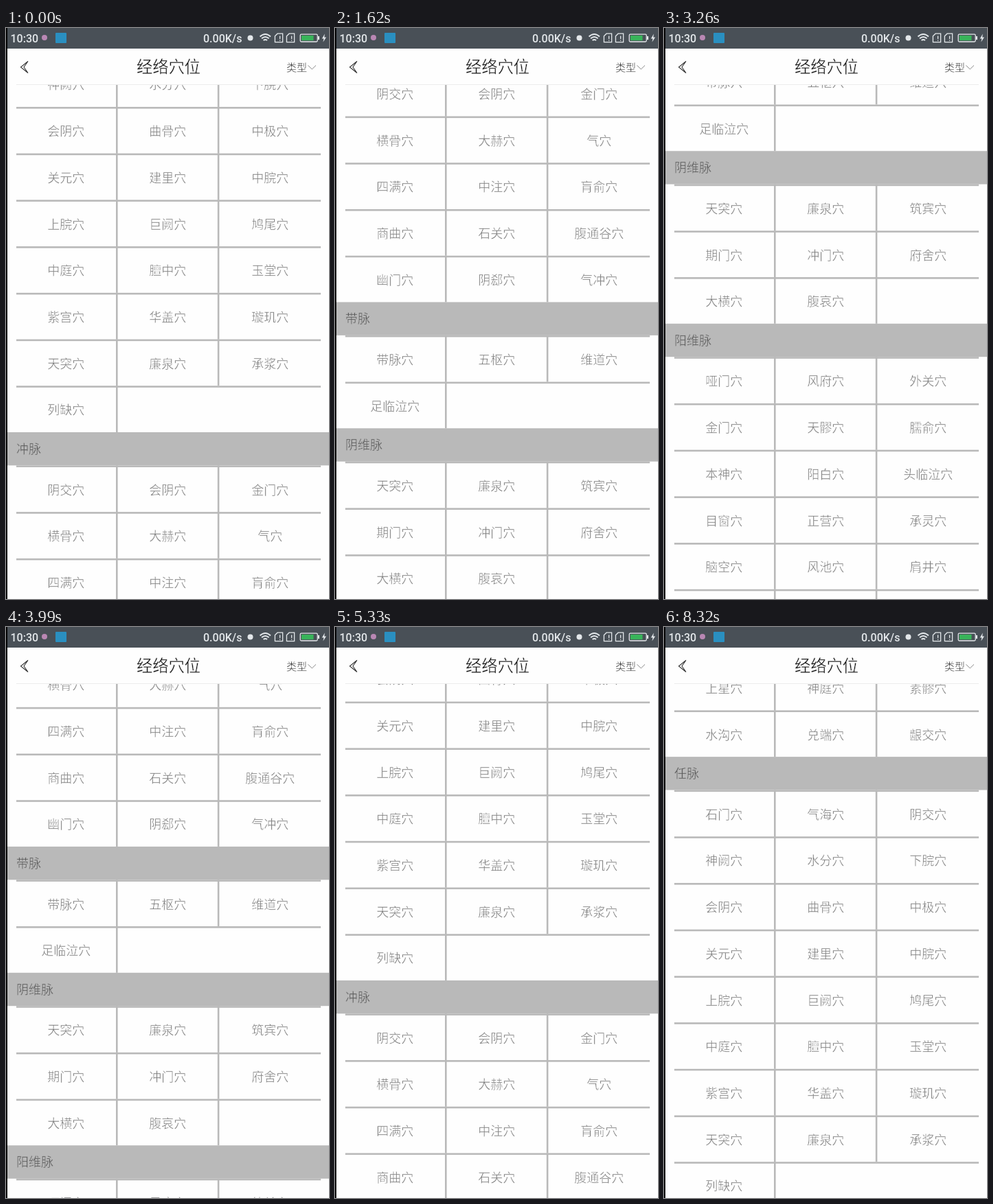
These frames come from a looping animation (470 px wide and 832 px high, 8.37 s). An HTML page:

```html
<!DOCTYPE html>
<html lang="zh-CN">
<head>
<meta charset="utf-8">
<title>经络穴位</title>
<style>
  html, body { margin: 0; width: 100%; height: 100%; overflow: hidden; background: #fefefe; }
  svg { display: block; width: 100vw; height: 100vh; }
  /* A stroke in the background colour gives the glyphs a light weight. */
  text { font-family: "Noto Sans CJK SC", "Noto Sans CJK", sans-serif; font-weight: 300; stroke: #fefefe; stroke-width: .45; }
  .status { font: 500 16px Roboto, sans-serif; fill: #e3e7ea; stroke: none; }
  .cell { font-size: 18px; fill: #7c7c7c; text-anchor: middle; }
  .head { font-size: 18px; fill: #555; stroke: #b9b9b9; }
</style>
</head>
<body>
<svg viewBox="0 0 470 832" preserveAspectRatio="none">
  <defs><clipPath id="view"><rect y="83" width="470" height="749"/></clipPath></defs>
  <rect width="470" height="832" fill="#fefefe"/>
  <path d="M15 82.5H458" stroke="#ececec"/>
  <g clip-path="url(#view)"><g id="list"></g></g>

  <!-- title bar -->
  <g fill="none" stroke="#333">
    <path d="M32 48.5L21.5 57L32 65.5L26 57Z" stroke-width="1.1"/>
    <path d="M439.5 54.5L445.3 60L451 54.5" stroke="#888"/>
  </g>
  <text x="236.5" y="65.4" font-size="23.3" text-anchor="middle" fill="#111">经络穴位</text>
  <text x="408" y="62.6" font-size="15" fill="#222">类型</text>

  <!-- status bar -->
  <rect width="470" height="30" fill="#495057"/>
  <text class="status" x="6.5" y="21">10:30</text>
  <circle cx="56" cy="14" r="4" fill="#b987b4"/>
  <rect x="72" y="7" width="16" height="15" rx="1" fill="#2a8fc0"/>
  <text class="status" x="287" y="21">0.00K/s</text>
  <circle cx="355.5" cy="14.5" r="4" fill="#e3e7ea"/>
  <g fill="none" stroke="#e3e7ea" stroke-width="1.9">
    <path d="M369.5 12.5Q377.3 5.5 385 12.5M372 15.3Q377.3 10.6 382.6 15.3M374.6 18Q377.3 15.8 380 18"/>
    <g id="sim" stroke-width="1.3">
      <path d="M395 8.2H402.6V20.6H391.4V11.8Z"/>
      <path d="M398.6 11.5V16M398.6 17.4V18.8"/>
    </g>
    <use href="#sim" x="17"/>
    <rect x="428.2" y="9.2" width="25" height="10.8" rx="1.5" stroke-width="1.3"/>
  </g>
  <rect x="454" y="12" width="2" height="5" fill="#e3e7ea"/>
  <rect x="430" y="11" width="17.5" height="7.2" fill="#39b45a"/>
  <path d="M463.8 8.5L459.8 15.4H462.4L461.4 20.5L466 13.4H463.2Z" fill="#e3e7ea"/>
  <rect width="2" height="832" fill="#000"/>
</svg>
<script>
const LOOP = 8370, ROW = 67.72, HEAD = 48.4, LINE = 2.6, GRAY = "#b9b9b9";
const COLUMNS = [87.25, 235.25, 384.25], DIVIDERS = [160, 307.8];

// Rows are split by "/"; every name gets the suffix 穴.
const SECTIONS = [
  ["", "上星 神庭 素髎/水沟 兑端 龈交"],
  ["任脉", "石门 气海 阴交/神阙 水分 下脘/会阴 曲骨 中极/关元 建里 中脘/上脘 巨阙 鸠尾/中庭 膻中 玉堂/紫宫 华盖 璇玑/天突 廉泉 承浆/列缺"],
  ["冲脉", "阴交 会阴 金门/横骨 大赫 气/四满 中注 肓俞/商曲 石关 腹通谷/幽门 阴郄 气冲"],
  ["带脉", "带脉 五枢 维道/足临泣"],
  ["阴维脉", "天突 廉泉 筑宾/期门 冲门 府舍/大横 腹哀"],
  ["阳维脉", "哑门 风府 外关/金门 天髎 臑俞/本神 阳白 头临泣/目窗 正营 承灵/脑空 风池 肩井/阳交 臑会"]
];

// Position of the 冲脉 header over time; each swipe moves on from the last one.
const START = 589;
const SWIPES = [
  { start: 150, end: 880, steps: 6, to: 300.2, decay: 2.2 },
  { start: 1180, end: 2210, steps: 8, to: -143, decay: 2.2 },
  { start: 2510, end: 3550, steps: 8, to: -411.3, decay: 2.366 },
  { start: 3700, end: 4880, steps: 9, to: 423.1, decay: 2.2 },
  { start: 5180, end: 6520, steps: 10, to: 847, decay: 2.2 }
];

const list = document.getElementById("list");

function add(tag, attrs, content) {
  const el = document.createElementNS("http://www.w3.org/2000/svg", tag);
  for (const key in attrs) el.setAttribute(key, attrs[key]);
  if (content) el.textContent = content;
  list.appendChild(el);
}

const box = (x, y, width, height) => add("rect", { x, y, width, height, fill: GRAY });

function addRow(names, y) {
  box(15, y, 443, LINE);
  DIVIDERS.slice(0, names.length).forEach(x => box(x, y, LINE, ROW));
  names.forEach((name, i) => add("text", { class: "cell", x: COLUMNS[i], y: y + 42.2 }, name + "穴"));
}

function buildList() {
  let y = -(11 * ROW + HEAD);
  for (const [title, rows] of SECTIONS) {
    if (title) {
      box(2, y, 468, HEAD);
      add("text", { class: "head", x: 15, y: y + 31 }, title);
      y += HEAD;
    }
    for (const row of rows.split("/")) {
      addRow(row.split(" "), y);
      y += ROW;
    }
  }
}

const fling = (u, decay) => 1 - Math.pow(1 - Math.pow(u, 1.4), decay);

function scrollAt(t) {
  let y = START;
  for (const { start, end, steps, to, decay } of SWIPES) {
    const gap = (end - start) / (steps - 1);
    const step = Math.min(steps, 1 + Math.floor((t + 6 - start) / gap));
    if (step < 1) break;
    y += (to - y) * fling(step / steps, decay);
  }
  return y;
}

function draw(t) {
  list.setAttribute("transform", `translate(0 ${scrollAt(t).toFixed(2)})`);
}

buildList();
const origin = performance.now();
function tick() {
  draw((performance.now() - origin) % LOOP);
  requestAnimationFrame(tick);
}
tick();
</script>
</body>
</html>
```
